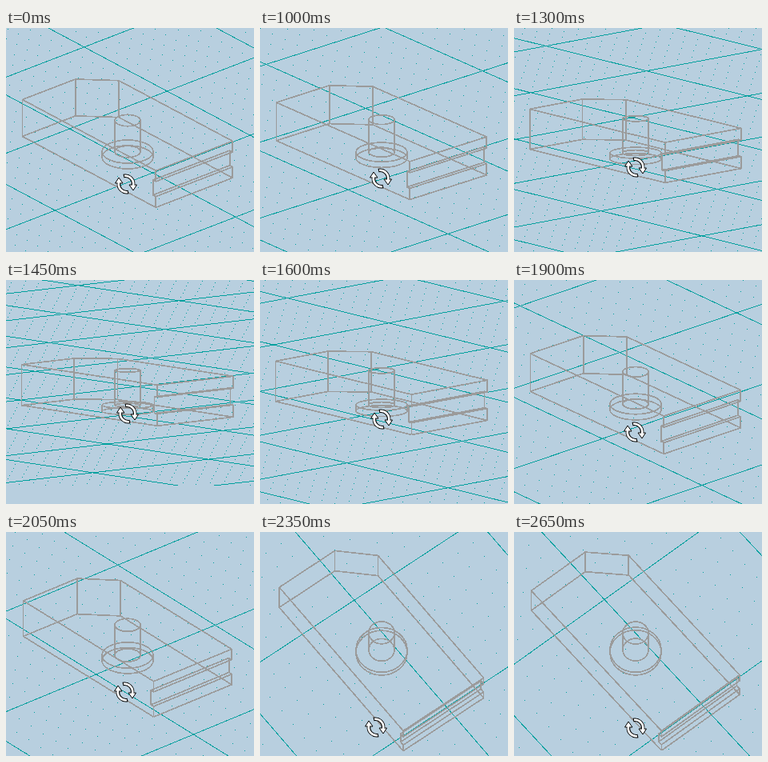
Animation of 310 by 280 pixels, one loop 2800 ms. Source, as an HTML page:

```html
<!DOCTYPE html>
<html lang="en">
<head>
<meta charset="utf-8">
<title>Orbiting a wireframe block</title>
<style>
  html, body { margin: 0; width: 100%; height: 100%; overflow: hidden; background: #b8cfdf; }
  svg { display: block; width: 310px; height: 280px; }
  path { fill: none; shape-rendering: crispEdges; }
  #grid, #dots { stroke: #00a09e; }
  #wire { stroke: #9b9b9b; stroke-width: 1.7; stroke-linejoin: round; }
  #cursor path { shape-rendering: auto; }
  #cursor .edge { stroke: #000; stroke-width: 4.6; }
  #cursor .fill { stroke: #fff; stroke-width: 2.6; }
  #cursor .head { fill: #fff; stroke: #000; }
</style>
</head>
<body>
<svg viewBox="0 0 310 280">
  <clipPath id="near"><rect id="edge" width="310" height="280"/></clipPath>
  <g clip-path="url(#near)">
    <path id="grid"/>
    <path id="dots"/>
  </g>
  <path id="wire"/>
  <g id="cursor">
    <path class="edge" d="M-3-10A10 10 0 0 1 9 1M3 10A10 10 0 0 1-9-1"/>
    <path class="head" d="M4 1H13.5L9 8ZM-4-1H-13.5L-9-8Z"/>
    <path class="fill" d="M-2-10.2A10 10 0 0 1 9 2M2 10.2A10 10 0 0 1-9-2"/>
  </g>
</svg>
<script>
const W = 310, H = 280, CX = 152, CY = 138.5, RAD = Math.PI / 180;
const HOLD = 1000, STEP = 150, LOOP = 2800;
const $ = id => document.getElementById(id);

// Cursor x, cursor y, turn in degrees; the tilt follows the cursor's y.
const poses = [
  [150, 195, 0], [151, 188, 0], [151, 181, -.3], [152, 174, -.6],
  [152, 167, -.8], [152, 174, -.9], [153, 181, -1], [151, 190, 0],
  [149, 200, 1.1], [147, 222, 2.2], [145, 244, 3.4], [149, 246, 2.2], [152, 245, 1.2]
];

const TOP = 25.75, BASE = -TOP, FLOOR = -120, GROOVE = 10.5;
const outline = [[128.5, -63], [-129, -63], [-129, 24], [-91, 63], [128.5, 63]];

function camera(turn, tilt) {
  const a = (49.6 + turn) * RAD, c = Math.cos(a), s = Math.sin(a);
  const sinT = Math.sin(tilt * RAD), cosT = Math.cos(tilt * RAD);
  const project = (u, v, z) => [
    CX + c * u + s * v,
    CY - sinT * (c * v - s * u) - cosT * z
  ];
  return { project, sinT };
}

const path = points => "M" + points.map(p => p.map(n => n.toFixed(1)).join(" ")).join("L");

function wire({ project, sinT }) {
  let d = "";
  const line = (...points) => d += path(points.map(p => project(...p)));
  const ring = (r, z) => {
    const [x, y] = project(0, 0, z), arc = `A${r} ${r * sinT} 0 0 1 `;
    d += `M${x - r} ${y}${arc}${x + r} ${y}${arc}${x - r} ${y}`;
  };
  const tube = (r, low, high) => {
    ring(r, low);
    ring(r, high);
    const y0 = project(0, 0, low)[1], y1 = project(0, 0, high)[1];
    for (const x of [CX - r, CX + r]) d += path([[x, y0], [x, y1]]);
  };

  for (const z of [TOP, BASE]) line(...outline.map(p => [...p, z]), [...outline[0], z]);
  for (const p of outline.slice(1, 4)) line([...p, BASE], [...p, TOP]);

  // Grooved end face
  const profile = [[128.5, TOP], [128.5, GROOVE], [123, GROOVE],
                   [123, -GROOVE], [128.5, -GROOVE], [128.5, BASE]];
  for (const v of [-63, 63]) line(...profile.map(([u, z]) => [u, v, z]));
  for (const [u, z] of profile.slice(1, 5)) line([u, -63, z], [u, 63, z]);

  tube(16, -18, TOP);
  tube(32, BASE, -18);
  return d;
}

function floor({ project }, size, u0, v0) {
  let lines = "", dots = "";
  const far = 3200, cell = size / 8;
  for (let k = -14; k <= 14; k++) {
    const u = u0 + k * size, v = v0 + k * size;
    lines += path([project(u, -far, FLOOR), project(u, far, FLOOR)]);
    lines += path([project(-far, v, FLOOR), project(far, v, FLOOR)]);
  }
  for (let i = -75; i <= 75; i++) for (let j = -75; j <= 75; j++) {
    const [x, y] = project(u0 + i * cell, v0 + j * cell, FLOOR);
    if (x > 0 && x < W && y > 0 && y < H) dots += `M${x | 0} ${(y | 0) + .5}h1`;
  }
  return [lines, dots];
}

function draw(index) {
  const [x, y, turn] = poses[index];
  const tilt = 7.6 + .69 * (y - 167);
  const cam = camera(turn, tilt);
  // The floor has a finer grid while the view rests.
  const [lines, dots] = index ? floor(cam, 192, -315, 50) : floor(cam, 160, -248, -44);
  $("grid").setAttribute("d", lines);
  $("dots").setAttribute("d", dots);
  // The near edge of the floor rises into view as the tilt flattens.
  $("edge").setAttribute("height", 257 + 6 * (tilt - 7.6));
  $("wire").setAttribute("d", wire(cam));
  $("cursor").setAttribute("transform", `translate(${x} ${y})`);
}

let shown = -1;
const start = performance.now();
function tick() {
  const t = (performance.now() - start) % LOOP;
  const index = t < HOLD ? 0 : 1 + Math.floor((t - HOLD) / STEP);
  if (index !== shown) draw(shown = index);
  requestAnimationFrame(tick);
}
tick();
</script>
</body>
</html>
```
